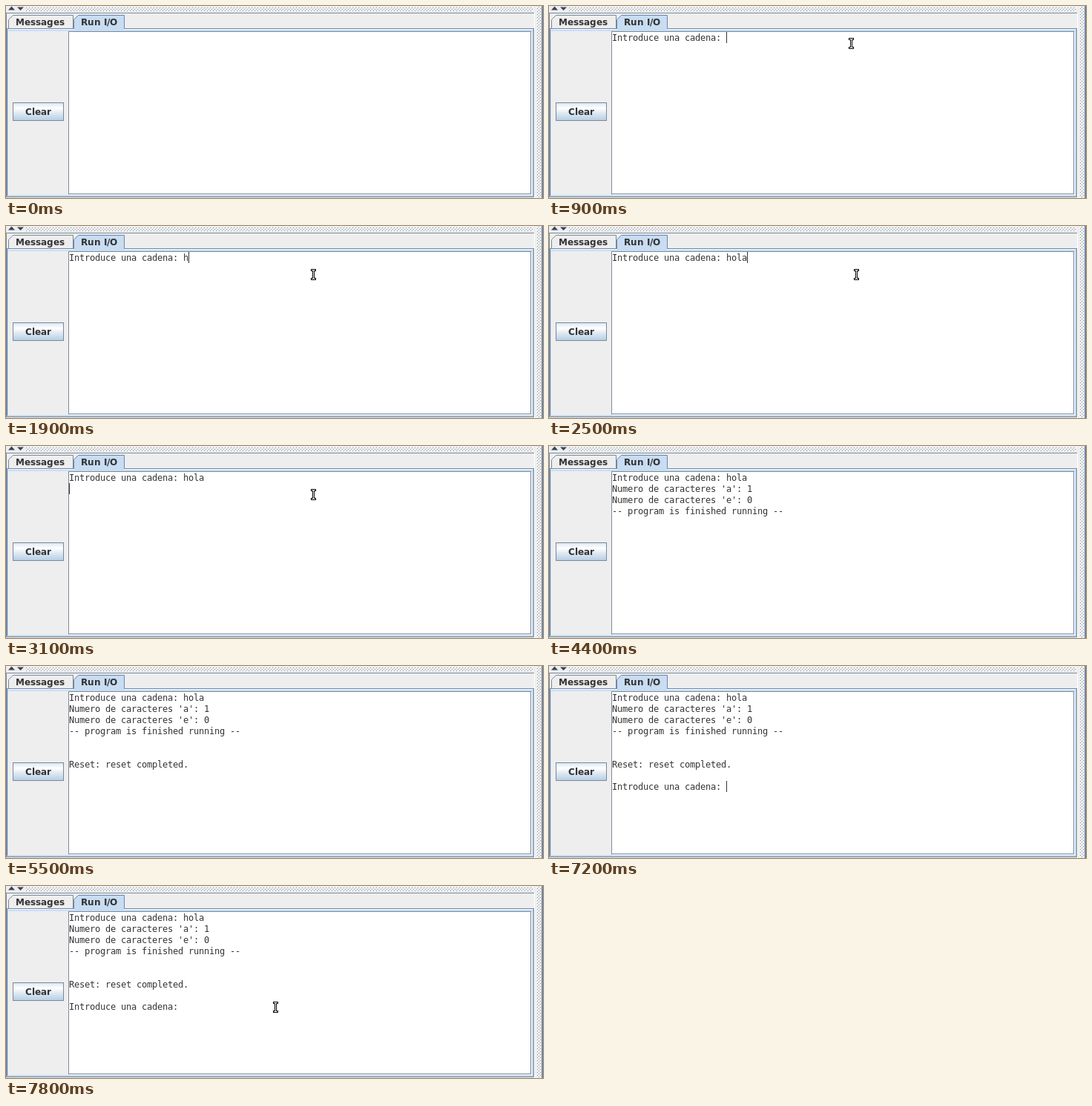
An HTML page with a canvas for the animation above (8000 ms loop, 724 px wide and 259 px high).

```html
<!DOCTYPE html>
<html lang="es">
<head>
<meta charset="utf-8">
<title>Run I/O console</title>
<style>
html, body { margin: 0; width: 100%; height: 100%; overflow: hidden; background: #eee; }
canvas { display: block; }
</style>
</head>
<body>
<canvas id="stage" width="724" height="259"></canvas>
<script>
const ctx = document.getElementById('stage').getContext('2d');
const LOOP = 8000;
const INK = '#333', GREY = '#7a8a99', BLUE = '#6a84ad', SHADOW = '#b8cfe5', PALE = '#c8ddf2', PANEL = '#eee';
const BOLD = 'bold 12px "DejaVu Sans", sans-serif', MONO = '12px "DejaVu Sans Mono", monospace';
const ORIGIN_X = 85, ORIGIN_Y = 35, CHAR_W = 7, LINE_H = 15;

const PROMPT = 'Introduce una cadena: ';
// [time, text appended to the console]
const OUTPUT = [
  [600, PROMPT], [1900, 'h'], [2100, 'o'], [2200, 'l'], [2500, 'a'], [3100, '\n'],
  [3200, "Numero de caracteres 'a': 1\nNumero de caracteres 'e': 0\n-- program is finished running --\n\n\n"],
  [5500, 'Reset: reset completed.\n\n'], [7200, PROMPT]
];
const CARET_ON = [[600, 1100], [1700, 2900], [3100, 3200], [7200, 7700]];
// [time, pointer shape, left, top]
const POINTER = [
  [0], [900, iBeam, 404, 42], [1000, iBeam, 410, 54], [1100, iBeam, 411, 57],
  [3200, arrow, 411, 62], [4200, arrow, 412, 49], [4400],
  [7500, iBeam, 400, 72], [7700, iBeam, 368, 157], [7800, iBeam, 360, 155]
];

function rect(color, x, y, w, h) {
  ctx.fillStyle = color;
  ctx.fillRect(x, y, w, h);
}

function box(fill, border, x, y, w, h) {
  rect(border, x, y, w, h);
  rect(fill, x + 1, y + 1, w - 2, h - 2);
}

function shape(points, fill, stroke) {
  ctx.beginPath();
  points.forEach(([x, y]) => ctx.lineTo(x, y));
  ctx.closePath();
  ctx.fillStyle = fill;
  ctx.fill();
  if (stroke) {
    ctx.strokeStyle = stroke;
    ctx.stroke();
  }
}

// Each glyph starts on a whole pixel, as in hinted desktop text
function drawText(text, font, x, y) {
  ctx.font = font;
  ctx.fillStyle = INK;
  for (const char of text) {
    ctx.fillText(char, x, y);
    x += Math.round(ctx.measureText(char).width);
  }
}

// Diagonal grip texture of the split pane dividers
function bumps(x, y, w, h) {
  for (let j = 0; j < h; j++) {
    for (let i = j % 4; i < w; i += 4) rect(j % 2 ? GREY : '#fff', x + i, y + j, 1, 1);
  }
}

function tab(text, x, y, w, fill, border) {
  const l = x + .5, t = y + .5, r = x + w - .5;
  shape([[l, 30.5], [l, t + 6], [l + 6, t], [r, t], [r, 30.5]], fill, border);
  drawText(text, BOLD, x + 10, 26);
}

function drawWindow() {
  rect(PANEL, 0, 0, 724, 259);
  bumps(26, 1, 685, 6);
  shape([[3, 5.5], [7.5, 0.5], [12, 5.5]], '#34445c');
  shape([[15, 1.5], [24, 1.5], [19.5, 6]], '#34445c');
  rect('#fff', 712, 9, 1, 250);
  rect(GREY, 0, 9, 712, 1);
  rect(GREY, 0, 9, 1, 249);
  bumps(715, -2, 6, 261);
  rect(GREY, 722, 0, 1, 259);
  rect(BLUE, 723, 0, 1, 259);

  tab('Messages', 3, 12, 88, PANEL, GREY);
  rect(GREY, 1, 30, 711, 228);
  rect(SHADOW, 1, 30, 710, 227);
  rect(BLUE, 1, 30, 710, 226);
  rect(SHADOW, 710, 31, 1, 226);
  rect(PALE, 2, 31, 708, 225);
  rect('#fff', 2, 31, 708, 1);
  rect(PANEL, 3, 34, 81, 221);
  tab('Run I/O', 91, 12, 69, PALE, BLUE);
  rect(PALE, 92, 30, 67, 2);
  rect('#fff', 85, 35, 624, 220);
  box('#fff', GREY, 84, 34, 624, 220);

  const sheen = ctx.createLinearGradient(0, 131, 0, 154);
  [[0, '#dde8f3'], [.3, '#fff'], [.6, '#dde8f3'], [1, SHADOW]].forEach(s => sheen.addColorStop(...s));
  box(sheen, GREY, 9, 130, 69, 25);
  drawText('Clear', BOLD, 26, 147);
}

function drawConsole(t) {
  const text = OUTPUT.filter(([at]) => at <= t).map(step => step[1]).join('');
  const lines = text.split('\n');
  lines.forEach((line, row) => drawText(line, MONO, ORIGIN_X, ORIGIN_Y + 12 + row * LINE_H));
  if (CARET_ON.some(([from, to]) => t >= from && t < to)) {
    const row = lines.length - 1;
    rect(INK, ORIGIN_X + lines[row].length * CHAR_W, ORIGIN_Y + row * LINE_H, 1, LINE_H);
  }
}

function iBeam(x, y) {
  rect('#000', x, y + 1, 7, 3);
  rect('#000', x, y + 13, 7, 3);
  rect('#000', x + 2, y + 1, 3, 15);
  rect('#fff', x + 1, y + 2, 5, 1);
  rect('#fff', x + 1, y + 14, 5, 1);
  rect('#fff', x + 3, y + 2, 1, 13);
}

function arrow(x, y) {
  const outline = [[.5, .5], [.5, 17], [4.5, 13.5], [7.5, 20.3], [10.5, 19], [7.5, 12.5], [13, 12.5]];
  shape(outline.map(([dx, dy]) => [x + dx, y + dy]), '#fff', '#000');
}

function frame(now) {
  const t = now % LOOP;
  drawWindow();
  drawConsole(t);
  const [, pointer, x, y] = POINTER.filter(([at]) => at <= t).pop();
  if (pointer) pointer(x, y);
  requestAnimationFrame(() => frame(performance.now()));
}
frame(0);
</script>
</body>
</html>
```
